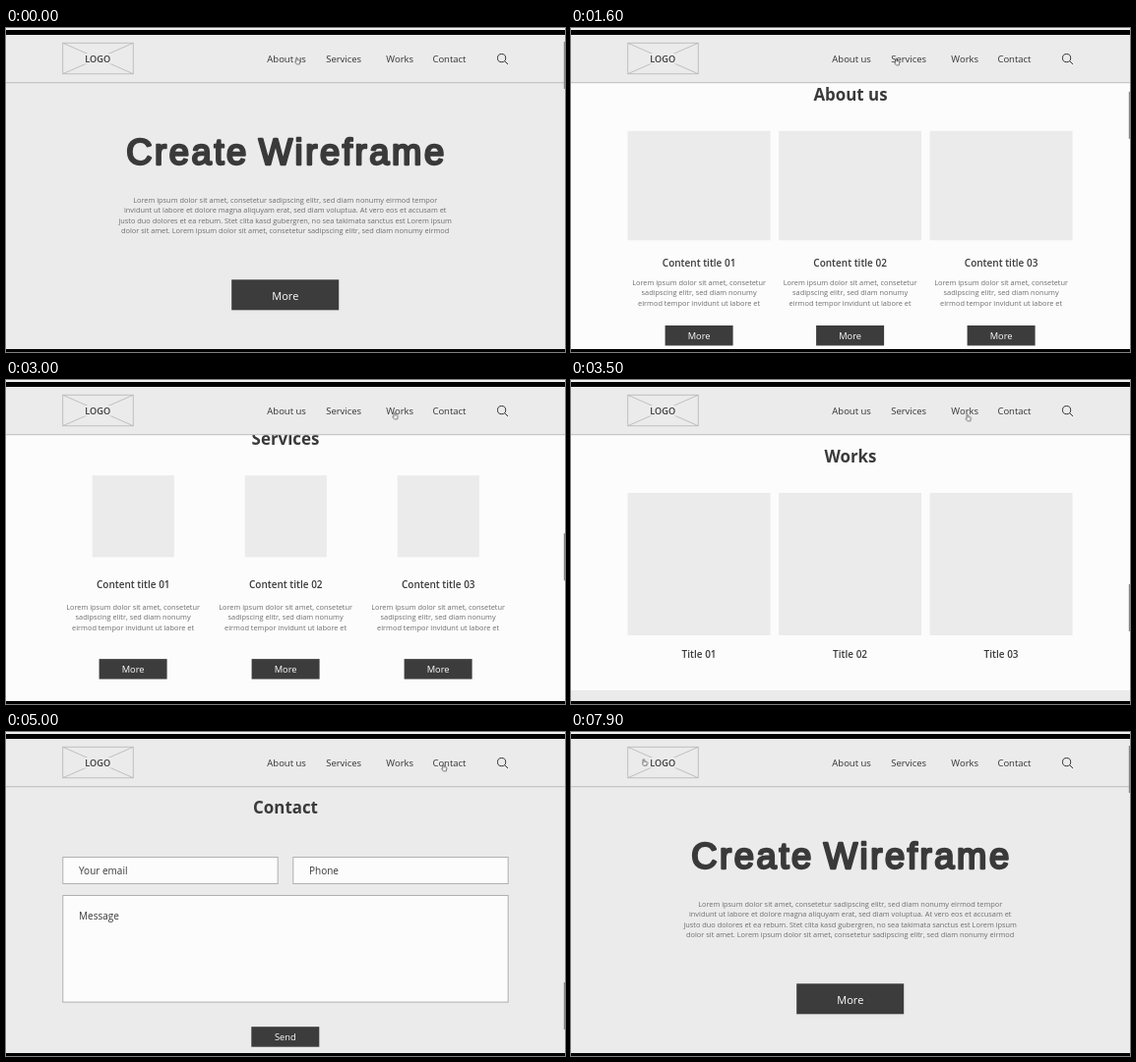
Recreate the animation shown at these times as an HTML page. Size 568 by 330 pixels, loop 8000 ms.

```html
<!DOCTYPE html>
<html lang="en">
<head>
<meta charset="utf-8">
<title>Wireframe walkthrough</title>
<style>
@property --s { syntax: "<number>"; inherits: true; initial-value: 0; }
html, body { margin: 0; width: 100%; height: 100%; overflow: hidden; background: #ececec; }
svg { display: block; width: 568px; height: 330px; animation: scroll 8s infinite; }
text { font-family: "Open Sans", "Noto Sans", sans-serif; fill: #3a3a3a; }
.mid { text-anchor: middle; }
.nav { font-size: 9.5px; fill: #333; }
.logo { font-size: 9.2px; font-weight: 600; }
.hero {
  font-family: "Liberation Sans", Arial, sans-serif; font-size: 36.4px;
  letter-spacing: 2.6px; word-spacing: -3px;
  stroke: #3a3a3a; stroke-width: 2.4px; stroke-linejoin: round; stroke-linecap: round;
}
.head { font-size: 16.9px; font-weight: 700; }
.title { font-size: 10px; font-weight: 600; }
.body { font-size: 7.38px; fill: #6e6e6e; }
.field { font-size: 10px; }
.btn { font-size: 9.3px; fill: #fff; }
.big { font-size: 11px; }
.dark { fill: #3c3c3c; }
.gray { fill: #ebebeb; }
.white { fill: #fcfcfc; }
.box { fill: #fcfcfc; stroke: #b0b0b0; }

#page { transform: translateY(calc(var(--s) * -1px)); }
#thumb { transform: translateY(calc(var(--s) * .1808px)); }
#cursor { animation: move 8s infinite; }
#hand { animation: hand 8s step-end infinite; }
#arrow { animation: arrow 8s step-end infinite; }

@keyframes scroll {
  0%, .625% { --s: 0; animation-timing-function: ease-in-out; }
  7.5%, 19.375% { --s: 271; animation-timing-function: ease-in-out; }
  25.625%, 36.875% { --s: 769; animation-timing-function: ease-in-out; }
  40.625%, 56.875% { --s: 1073; animation-timing-function: ease-in-out; }
  61.875%, 93.125% { --s: 1333; animation-timing-function: ease-in-out; }
  98.5%, 100% { --s: 0; }
}
@keyframes move {
  0%, 9.5% { transform: translate(293px, 29.5px); animation-timing-function: ease-in-out; }
  13.75%, 24.5% { transform: translate(328px, 30.5px); animation-timing-function: ease-in-out; }
  28.5%, 37% { transform: translate(392px, 32.5px); animation-timing-function: ease-in-out; }
  41%, 49.4% { transform: translate(400.5px, 34.5px); animation-timing-function: ease-in-out; }
  55%, 79.5% { transform: translate(442px, 32.5px); animation-timing-function: ease-in-out; }
  87.5% { transform: translate(37px, 2px); animation-timing-function: ease-out; }
  90%, 91% { transform: translate(54.5px, 20px); animation-timing-function: ease-in-out; }
  93%, 100% { transform: translate(71.5px, 27px); }
}
@keyframes hand {
  0% { opacity: 1; }
  26.5% { opacity: 0; }
  28% { opacity: 1; }
  52% { opacity: 0; }
  54% { opacity: 1; }
  80% { opacity: 0; }
  92% { opacity: 1; }
}
@keyframes arrow {
  0% { opacity: 0; }
  26.5% { opacity: 1; }
  28% { opacity: 0; }
  52% { opacity: 1; }
  54% { opacity: 0; }
  80% { opacity: 1; }
  92% { opacity: 0; }
}
</style>
</head>
<body>
<svg viewBox="0 0 568 330">
  <defs><clipPath id="view"><rect y="56" width="568" height="271"/></clipPath></defs>
  <rect class="gray" width="568" height="330"/>
  <g clip-path="url(#view)"><g id="page"></g></g>

  <rect class="gray" y="7" width="568" height="49"/>
  <rect y="55.2" width="568" height="1" fill="#bdbdbd"/>
  <rect id="thumb" x="566.8" y="14" width="1.2" height="48" fill="#858585"/>
  <g fill="none" stroke="#b4b4b4" stroke-width=".8">
    <path d="M57.7 15.3H129.3V46.7H57.7ZL129.3 46.7M129.3 15.3L57.7 46.7"/>
  </g>
  <rect class="gray" x="79.5" y="26" width="27.5" height="10.5"/>
  <text class="logo mid" x="93.3" y="34.8">LOGO</text>
  <g id="nav"></g>
  <g fill="none" stroke="#333">
    <circle cx="503.6" cy="30.6" r="4.1"/>
    <path d="M506.6 33.6L510 37"/>
  </g>

  <rect width="568" height="2" fill="#f0f0f0"/>
  <rect y="2" width="568" height="5"/>
  <rect y="327" width="568" height="3"/>

  <g id="cursor" fill="#fafafa" stroke="#444" stroke-width=".75" stroke-linejoin="round">
    <path id="hand" d="M1.8 4.6V1Q2.4 .1 3 1V3L5.4 3.4Q6 3.6 5.9 4.4L5.3 7.2H2.3L.5 4.9Q.8 3.9 1.8 4.6Z"/>
    <path id="arrow" d="M.4 .4V6.3L1.8 5.1L2.9 7.5L3.8 7.1L2.8 4.8H4.5Z"/>
  </g>
</svg>
<script>
const text = (cls, x, y, str) => `<text class="${cls}" x="${x}" y="${y}">${str}</text>`;
const rect = (cls, x, y, w, h) => `<rect class="${cls}" x="${x}" y="${y}" width="${w}" height="${h}"/>`;
const lines = (x, y, gap, list) => list.map((str, i) => text("body mid", x, y + i * gap, str)).join("");
const button = (x, y, str) =>
  rect("dark", x - 34.5, y, 69, 20.5) + text("btn mid", x, y + 13.9, str);
const section = (top, cls, height, body) =>
  `<g transform="translate(0 ${top})">${rect(cls, 0, 56, 568, height)}${body}</g>`;

const blurb = [
  "Lorem ipsum dolor sit amet, consetetur",
  "sadipscing elitr, sed diam nonumy",
  "eirmod tempor invidunt ut labore et"
];
const intro = [
  "Lorem ipsum dolor sit amet, consetetur sadipscing elitr, sed diam nonumy eirmod tempor",
  "invidunt ut labore et dolore magna aliquyam erat, sed diam voluptua. At vero eos et accusam et",
  "justo duo dolores et ea rebum. Stet clita kasd gubergren, no sea takimata sanctus est Lorem ipsum",
  "dolor sit amet. Lorem ipsum dolor sit amet, consetetur sadipscing elitr, sed diam nonumy eirmod"
];

// Three columns, each an image with a title below it.
const columns = (mid, gap, w, h, titleY, label) => [0, 1, 2].map(i => {
  const x = mid + (i - 1) * gap;
  return rect("gray", x - w / 2, 115, w, h) + text("title mid", x, titleY, `${label} 0${i + 1}`);
}).join("");

// The blurb and button under each column.
const details = (mid, gap, textY, buttonY) => [-1, 0, 1].map(i => {
  const x = mid + i * gap;
  return lines(x, textY, 10.6, blurb) + button(x, buttonY, "More");
}).join("");

const heading = (str, y = 83.8) => text("head mid", 284, y, str);

const hero = text("hero mid", 285, 138.8, "Create Wireframe") +
  lines(283.7, 178.4, 10.05, intro) +
  rect("dark", 229.2, 256.3, 109, 31) + text("btn big mid", 283.8, 276.5, "More");

const about = heading("About us") +
  columns(283.6, 153.5, 145, 111.5, 253, "Content title") + details(283.6, 153.5, 271.9, 313.2);

const services = heading("Services") +
  columns(284.3, 155, 83.2, 83.2, 230.2, "Content title") + details(284.1, 155, 251.3, 301.9);

const works = heading("Works") + columns(283.6, 153.5, 145, 145, 283, "Title");

const contact = heading("Contact", 82.5) +
  rect("box", 57.8, 127.5, 218.4, 27) + text("field", 74, 144.9, "Your email") +
  rect("box", 291.8, 127.5, 218.4, 27) + text("field", 308, 144.9, "Phone") +
  rect("box", 57.8, 166.5, 452.4, 108.6) + text("field", 74, 190.8, "Message") +
  button(283.8, 300.2, "Send");

document.getElementById("page").innerHTML =
  section(0, "gray", 271, hero) +
  section(271, "white", 304, about) +
  section(575, "gray", 194, "") +
  section(769, "white", 304, services) +
  section(1073, "white", 260, works) +
  section(1333, "gray", 300, contact);

document.getElementById("nav").innerHTML =
  [["About us", 265.3], ["Services", 325.2], ["Works", 386.3], ["Contact", 433.4]]
    .map(([str, x]) => text("nav", x, 35, str)).join("");
</script>
</body>
</html>
```
